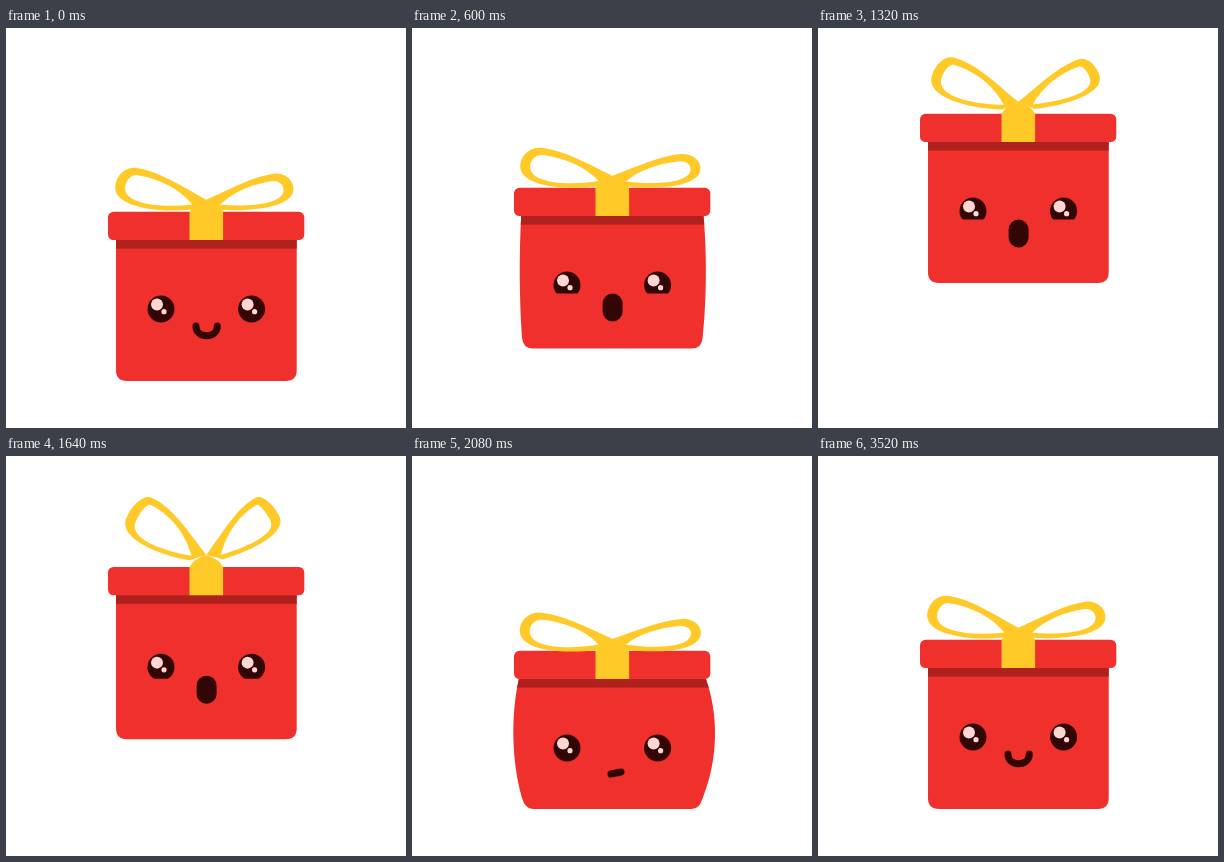
Animation, 400 px wide and 400 px high, one loop 3.56 s. Source, as an HTML page with a canvas:

```html
<!DOCTYPE html>
<html lang="en">
<head>
<meta charset="utf-8">
<title>Jumping gift</title>
<style>
  html, body { margin: 0; width: 100%; height: 100%; overflow: hidden; background: #fff; }
  canvas { display: block; width: 400px; height: 400px; }
</style>
</head>
<body>
<canvas id="stage" width="400" height="400"></canvas>
<script>
const ctx = document.getElementById('stage').getContext('2d');
const LOOP = 3560, STEP = 40;
const RED = '#f0302d', SHADE = '#ae211d', GOLD = '#ffca28', DARK = '#330606', SHINE = '#fcd6d2';
const TAKEOFF = 538, APEX = 1340, LANDING = 1900, HEIGHT = 98;

const ramp = (t, from, to) => Math.min(1, Math.max(0, (t - from) / (to - from)));
const ease = (t, from, to) => {
  const u = ramp(t, from, to);
  return u * u * (3 - 2 * u);
};
// Eases from 0 to 1 between a and b, then back to 0 between c and d.
const pulse = (t, a, b, c, d) => ease(t, a, b) - ease(t, c, d);

function lift(t) {
  if (t < APEX) return HEIGHT * (1 - (1 - ramp(t, TAKEOFF, APEX)) ** 5);
  return HEIGHT * (1 - ramp(t, APEX, LANDING) ** 2);
}

const squash = t => 11.8 * pulse(t, 40, 360, 540, 710) + 11.5 * pulse(t, 1880, 2040, 2040, 2360);
const stretch = t => 3.5 * pulse(t, APEX, 1740, 1760, LANDING);
const bulge = t => 13 * (pulse(t, 40, 360, 475, 660) + pulse(t, 1870, 2040, 2040, 2360));
const squint = t => pulse(t, 160, 440, 1480, 1780);
const gape = t => 2 * pulse(t, 200, 520, 1900, 2260);

// Tilt of the bow loops in degrees: they sag at takeoff and landing and fly up in the fall.
function bowTilt(t) {
  const flare = ramp(t, 640, 1740) ** 2 * (1 - ease(t, 1740, 2000));
  const sag = 2.5 * pulse(t, 440, 640, 640, 900) + 3.3 * pulse(t, 1900, 2060, 2160, 2360);
  return 9.3 + 19.5 * flare - sag;
}

function disc(x, y, r, color) {
  ctx.fillStyle = color;
  ctx.beginPath();
  ctx.arc(x, y, r, 0, 2 * Math.PI);
  ctx.fill();
}

// A petal along the x axis, from its start over the crest and round the tip to its end.
function tracePetal(start, end, crest, length, upper, lower) {
  const k = 0.55;
  ctx.moveTo(...start);
  ctx.bezierCurveTo(28, -upper / 2, 50, -upper, crest, -upper);
  ctx.bezierCurveTo(crest + k * (length - crest), -upper, length, -k * upper, length, 0);
  ctx.bezierCurveTo(length, 1.25 * lower, 45, 1.15 * lower, ...end);
  ctx.closePath();
}

function drawLoop(dir, degrees, length, upper, lower) {
  const size = length - degrees / 4, crest = 0.78 * length, rise = upper + degrees / 2;
  const mouth = [13, 7];
  ctx.save();
  ctx.scale(dir, 1);
  ctx.rotate(-degrees * Math.PI / 180);
  ctx.beginPath();
  tracePetal([0, 0], [13, 12], crest, size, rise, lower);
  tracePetal(mouth, mouth, crest - 2, size - 10, rise - 7, lower - 4);
  ctx.fill('evenodd');
  ctx.restore();
}

function drawBow(top, t) {
  ctx.save();
  ctx.translate(200.3, top - 12);
  ctx.fillStyle = GOLD;
  drawLoop(-1, bowTilt(t), 94.5, 15.5, 18);
  drawLoop(1, 1.1 * bowTilt(t + 80) - 2, 90, 12, 16);
  ctx.beginPath();
  ctx.moveTo(-16.8, 40.3);
  ctx.lineTo(-16.8, 12);
  ctx.quadraticCurveTo(-13, 4, 0, 0);
  ctx.quadraticCurveTo(13, 4, 16.8, 12);
  ctx.lineTo(16.8, 40.3);
  ctx.fill();
  ctx.restore();
}

function drawBody(top, bottom, b) {
  const left = 110, right = 290.7, upper = top + 35, lower = bottom - 50, corner = bottom - 11;
  ctx.save();
  ctx.beginPath();
  ctx.moveTo(left - 0.25 * b, top);
  ctx.bezierCurveTo(left - 0.88 * b, upper, left - 0.88 * b, lower, left, corner);
  ctx.quadraticCurveTo(left + 0.25 * b, bottom, left + 11, bottom);
  ctx.lineTo(right - 11, bottom);
  ctx.quadraticCurveTo(right - 0.25 * b, bottom, right, corner);
  ctx.bezierCurveTo(right + 1.28 * b, lower, right + 1.28 * b, upper, right + 0.25 * b, top);
  ctx.closePath();
  ctx.fillStyle = RED;
  ctx.fill();
  ctx.clip();
  ctx.fillStyle = SHADE;
  ctx.fillRect(90, top, 220, 8.8);
  ctx.restore();
}

function drawLid(top) {
  ctx.fillStyle = RED;
  ctx.beginPath();
  ctx.roundRect(102, top, 196.3, 28.3, 5.5);
  ctx.fill();
}

function drawEye(x, y, closed) {
  ctx.save();
  ctx.beginPath();
  ctx.rect(x - 20, y - 20, 40, 34 - 5.5 * closed);
  ctx.clip();
  disc(x, y, 13.5, DARK);
  disc(x - 4, y - 4.5, 6, SHINE);
  disc(x + 3, y + 2.7, 2.6, SHINE);
  ctx.restore();
}

// One thick stroke: a smile at 0, a short dash at 1, a round open mouth at 2.
function drawMouth(eyeY, amount) {
  const smile = Math.max(0, 1 - amount), open = Math.max(0, amount - 1);
  const x = 204 - 3.4 * Math.max(smile, open);
  const y = eyeY + 25 - 8 * smile - 2.5 * open;
  const half = 5 + 5.7 * smile - 5 * open;
  const tilt = (1 - smile) * (1 + 3 * open);
  const sag = 13 * smile;
  ctx.strokeStyle = DARK;
  ctx.lineWidth = 7 + 13 * open;
  ctx.lineCap = 'round';
  ctx.beginPath();
  ctx.moveTo(x - half, y + tilt);
  ctx.bezierCurveTo(x - half, y + tilt + sag, x + half, y - tilt + sag, x + half, y - tilt);
  ctx.stroke();
}

function draw(t) {
  const rise = lift(t), dip = squash(t);
  const lidTop = 183.8 - rise + dip - stretch(t);
  const eyeY = 281 - rise + dip;

  ctx.fillStyle = '#fff';
  ctx.fillRect(0, 0, 400, 400);
  drawBody(lidTop + 28, 353 - rise, bulge(t));
  drawLid(lidTop);
  drawBow(lidTop, t);
  drawEye(155, eyeY, squint(t));
  drawEye(245.6, eyeY, squint(t));
  drawMouth(eyeY, gape(t));
}

const begin = performance.now();
function tick() {
  const t = (performance.now() - begin) % LOOP;
  draw(Math.floor(t / STEP) * STEP);
  requestAnimationFrame(tick);
}
tick();
</script>
</body>
</html>
```
